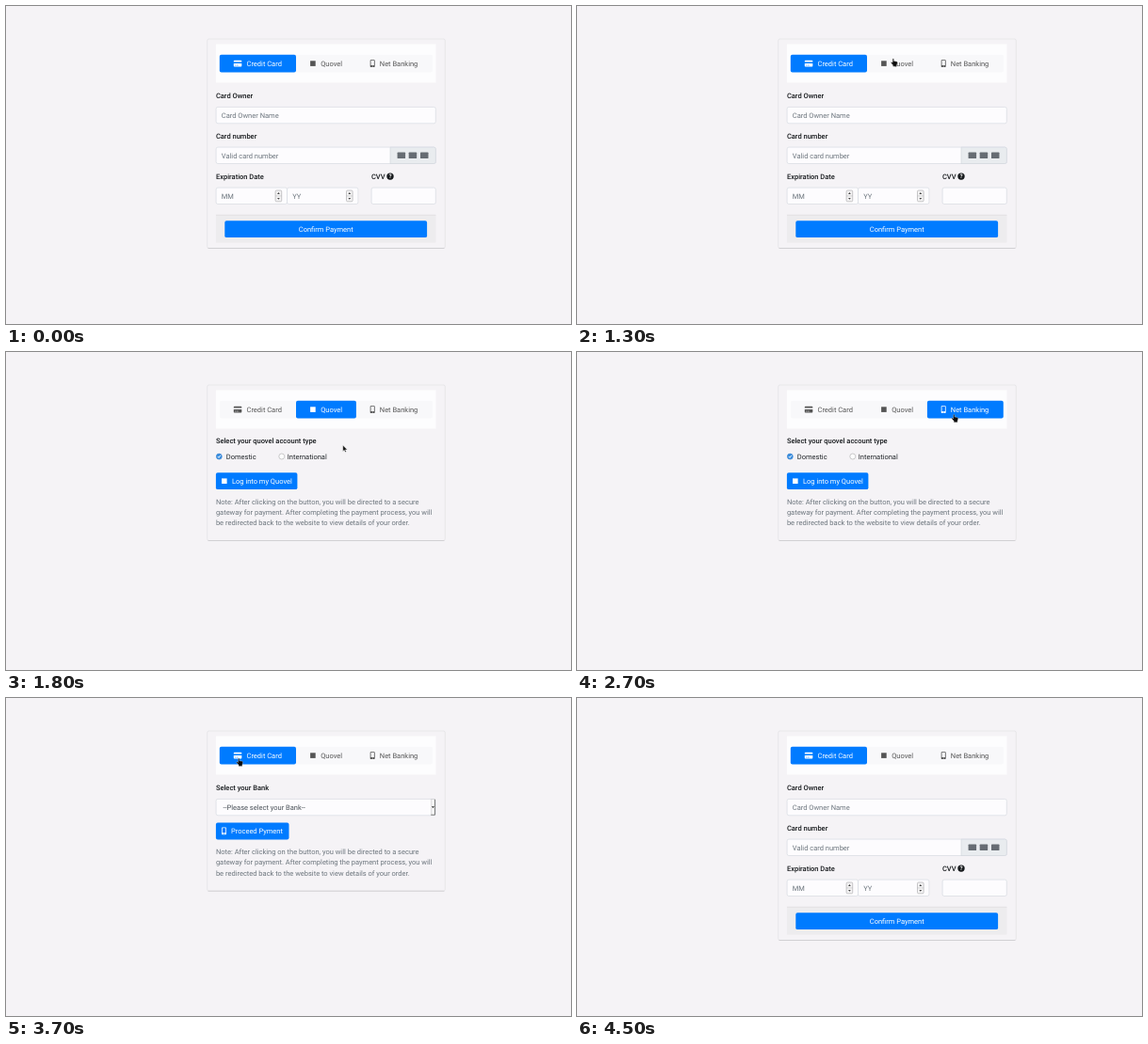
An HTML page that plays this animation: 600x338 px, repeating every 5 s.

```html
<!DOCTYPE html>
<html lang="en">
<head>
<meta charset="utf-8">
<title>Payment form</title>
<style>
html, body { margin: 0; width: 100%; height: 100%; overflow: hidden; background: #f5f3f6; }
svg { display: block; width: 100vw; height: 100vh; }
text { font: 7.5px Roboto, sans-serif; fill: #6c757d; white-space: pre; text-rendering: geometricPrecision; }
.label { font-weight: 500; fill: #15181b; }
.dark { fill: #212529; }
.light { fill: #fff; }
.field { fill: #fdfcfe; stroke: #ced4da; stroke-width: .55; }
.blue { fill: #007bff; }
.tab { color: #555; }
.tab.on { color: #fff; }
.tab text, .icon { fill: currentColor; }
.tab rect.back { fill: none; }
.tab.on rect.back { fill: #007bff; }
</style>
</head>
<body>
<svg id="stage" viewBox="0 0 600 338"></svg>
<script>
const stage = document.getElementById('stage');
const BRAND = 'Quovel';

const text = (x, y, s, cls = '', extra = '') => `<text x="${x}" y="${y}" class="${cls}" ${extra}>${s}</text>`;
const rect = (x, y, w, h, attrs = '', r = 1.9) =>
  `<rect x="${x}" y="${y}" width="${w}" height="${h}" rx="${r}" ${attrs}/>`;
const field = (x, y, w) => rect(x, y, w, 17.4, 'class="field"');
const button = (x, y, w) => rect(x, y, w, 17.9, 'class="blue"');
const at = (x, y, s) => `<g transform="translate(${x} ${y})">${s}</g>`;

const cardIcon = `<path class="icon" fill-rule="evenodd" d="M.8 0H7.7Q8.5 0 8.5 .8V1.7H0V.8Q0 0 .8 0Z
  M0 3.3H8.5V5.9Q8.5 6.7 7.7 6.7H.8Q0 6.7 0 5.9Z M1.2 4.9V5.5H2.5V4.9Z M2.9 4.9V5.5H5V4.9Z"/>`;
const phoneIcon = `<path class="icon" fill-rule="evenodd" d="M.7 0H4.3Q5 0 5 .7V7.1Q5 7.8 4.3 7.8H.7Q0 7.8 0 7.1V.7Q0 0 .7 0Z
  M.8 .8V5.8H4.2V.8Z M2.5 6.3A.5 .5 0 1 0 2.5 7.3A.5 .5 0 1 0 2.5 6.3Z"/>`;
const brandIcon = rect(0, 0, 5.6, 5.6, 'class="icon"', 0);

const tab = (x, w, icon, tx, s) =>
  `<g class="tab">${rect(x, 51.8, w, 18.6, 'class="back"')}${icon}${text(tx, 63.8, s)}</g>`;

const spinner = (x, y) => rect(x, y, 6.6, 11.8, 'fill="#f4f3f4" stroke="#a3a3a5" stroke-width=".6"', 1.2) +
  `<path d="M${x} ${y + 5.9}h6.6" stroke="#b5b5b7" stroke-width=".5"/>
   <path d="M${x + 1.9} ${y + 4}l1.4 -1.9l1.4 1.9zM${x + 1.9} ${y + 7.9}l1.4 1.9l1.4 -1.9z" fill="#444"/>`;

const note = y => [
  'Note: After clicking on the button, you will be directed to a secure',
  'gateway for payment. After completing the payment process, you will',
  'be redirected back to the website to view details of your order.'
].map((s, i) => text(222.9, y + i * 11.25, s)).join('');

const creditPane =
  text(222.9, 97.6, 'Card Owner', 'label') + field(223.1, 107.4, 233.2) + text(228.8, 118.9, 'Card Owner Name') +
  text(222.9, 140.8, 'Card number', 'label') + field(223.1, 150.1, 233.2) +
  `<path d="M408 150.1H454.4Q456.3 150.1 456.3 152V165.6Q456.3 167.5 454.4 167.5H408Z" fill="#e9ecef" stroke="#ced4da" stroke-width=".55"/>` +
  text(228.8, 161.7, 'Valid card number') +
  [415.6, 427.7, 440].map(x => rect(x, 155.6, 8.5, 6.5, 'fill="#666c73"', .7)).join('') +
  text(222.9, 183.6, 'Expiration Date', 'label') + text(387.9, 183.6, 'CVV', 'label') +
  '<circle cx="408" cy="181.1" r="3.7" fill="#15181b"/>' +
  text(408, 183.4, '?', 'light', 'text-anchor="middle" style="font-size:6.3px;font-weight:700"') +
  field(223.1, 193.1, 75.4) + field(298.5, 193.1, 75.4) + field(388.1, 193.1, 68.2) +
  text(228.8, 204.7, 'MM') + text(304.2, 204.7, 'YY') + spinner(286.1, 196) + spinner(361.5, 196) +
  rect(222.9, 222, 233.6, 29.5, 'fill="#edecee"', 0) +
  '<path d="M222.9 222.2H456.5" stroke="#d8d7da" stroke-width=".6"/>' +
  button(232.3, 228.2, 214.8) + text(339.7, 239.9, 'Confirm Payment', 'light', 'text-anchor="middle"');

const walletPane =
  text(222.9, 96.7, `Select your ${BRAND.toLowerCase()} account type`, 'label') +
  '<circle cx="226.3" cy="111.1" r="3" fill="#3b8fe0" stroke="#2a76c6" stroke-width=".5"/>' +
  '<path d="M224.8 111l1.2 1.3l2 -2.6" fill="none" stroke="#fff" stroke-width=".9"/>' +
  text(233.8, 114, 'Domestic', 'dark') +
  '<circle cx="292.8" cy="111" r="3" fill="#fdfdfe" stroke="#aaa" stroke-width=".6"/>' +
  text(298.8, 114, 'International', 'dark') +
  button(222.9, 128.2, 86.5) + `<g color="#fff">${at(229, 134.4, brandIcon)}</g>` +
  text(240, 139.9, `Log into my ${BRAND}`, 'light') + note(161.9);

const bankPane =
  text(222.9, 97.6, 'Select your Bank', 'label') + field(223.1, 107.4, 233.2) +
  text(230.4, 118.9, '--Please select your Bank--', '', 'style="fill:#495057"') +
  rect(451.3, 107.8, 4.2, 16.4, 'fill="#f4f4f5" stroke="#bbb" stroke-width=".4"', 0) +
  '<path d="M455.5 107.8V124.2H451.3" fill="none" stroke="#555" stroke-width=".7"/>' +
  '<path d="M452 115.3h2.9l-1.45 1.6z" fill="#111"/>' +
  button(222.9, 132.5, 77.6) + `<g color="#fff">${at(229, 137.5, phoneIcon)}</g>` +
  text(239, 144.1, 'Proceed Pyment', 'light') + note(166.2);

const arrow = '<path d="M0 0V6.7L1.5 5.3L2.5 7.6L3.7 7.1L2.7 4.9H4.8Z" fill="#111" stroke="#fff" stroke-width=".5"/>';
const hand = `<path d="M2.2 .7Q2.9 -.2 3.5 .7V3L6.5 3.5Q7.5 3.9 7.3 5L6.6 7.2V8.7H2.7V7.3L.5 5Q.1 4 1 4L2.2 4.7Z"
  fill="#0b0b0b" stroke="#fff" stroke-width=".3"/>`;

stage.innerHTML =
  '<g id="card"><rect x="213.7" y="35" width="252.6" rx="1.9" fill="#f5f3f6" stroke="#dddcdf" stroke-width=".55"/>' +
  '<path stroke="#cccbcf" stroke-width=".8"/></g>' +
  rect(222.9, 40.5, 233.6, 41, 'fill="#fdfdfe"', 0) +
  rect(227, 51.8, 226, 18.6, 'fill="#f8f8fa"') +
  tab(226.8, 81.2, at(241.8, 57.8, cardIcon), 255.5, 'Credit Card') +
  tab(308, 63.9, at(323.1, 58.3, brandIcon), 334.2, BRAND) +
  tab(371.9, 80.9, at(386.7, 57.2, phoneIcon), 396.8, 'Net Banking') +
  [creditPane, walletPane, bankPane].map(p => `<g class="pane">${p}</g>`).join('') +
  `<g id="cursor"><g>${arrow}</g><g>${hand}</g></g>`;

const tabs = stage.querySelectorAll('.tab');
const panes = stage.querySelectorAll('.pane');
const [cardBox, cardEdge] = stage.querySelector('#card').children;
const cursor = stage.querySelector('#cursor');
const bottoms = [257.5, 200.5, 205.2];

// [time, selected tab]
const clicks = [[0, 0], [1500, 1], [2700, 2], [3700, 0]];
// [time, x, y] of the pointer
const path = [
  [600, 150, 299], [900, 342, 57], [1100, 419, 174], [1300, 333, 55.5], [1500, 333, 55.5],
  [1600, 340, 65], [1800, 357.7, 99], [2000, 234, 137], [2400, 406, 60], [2600, 400, 65],
  [2700, 397.5, 66], [2900, 308.4, 95], [3100, 264, 135], [3500, 248, 78], [3700, 244.3, 63.7],
  [3800, 235, 95], [4000, 74, 284]
];

const lastBefore = (rows, t) => rows.reduce((best, row, i) => row[0] <= t ? i : best, -1);

function pointer(t) {
  const i = lastBefore(path, t);
  if (i < 0 || t > path[path.length - 1][0]) return null;
  const a = path[i], b = path[i + 1] || a;
  const k = b === a ? 0 : (t - a[0]) / (b[0] - a[0]);
  return [a[1] + (b[1] - a[1]) * k, a[2] + (b[2] - a[2]) * k];
}

function draw(time) {
  const t = Math.floor(time % 5000 / 100) * 100;
  const click = clicks[lastBefore(clicks, t)];
  const paneClick = clicks[lastBefore(clicks, Math.max(0, t - 100))];
  const view = paneClick[1];
  const fading = paneClick[0] > 0 && t - paneClick[0] === 100;

  tabs.forEach((el, i) => el.classList.toggle('on', i === click[1]));
  panes.forEach((el, i) => {
    el.style.display = i === view ? '' : 'none';
    el.style.opacity = fading ? .5 : 1;
  });
  const bottom = bottoms[view];
  cardBox.setAttribute('height', bottom - 35);
  cardEdge.setAttribute('d', `M214.5 ${bottom}H465.5`);

  const p = pointer(t);
  cursor.style.display = p ? '' : 'none';
  if (p) {
    const [x, y] = p;
    const overTab = x > 226 && x < 450 && y > 50 && y < 69;
    const overButton = view && x > 222 && x < 300 && y > 130 && y < 147;
    const pointing = overTab || overButton;
    cursor.setAttribute('transform', `translate(${x} ${y})`);
    cursor.children[0].style.display = pointing ? 'none' : '';
    cursor.children[1].style.display = pointing ? '' : 'none';
  }
}

const start = performance.now();
function tick() {
  draw(performance.now() - start);
  requestAnimationFrame(tick);
}
tick();
</script>
</body>
</html>
```
